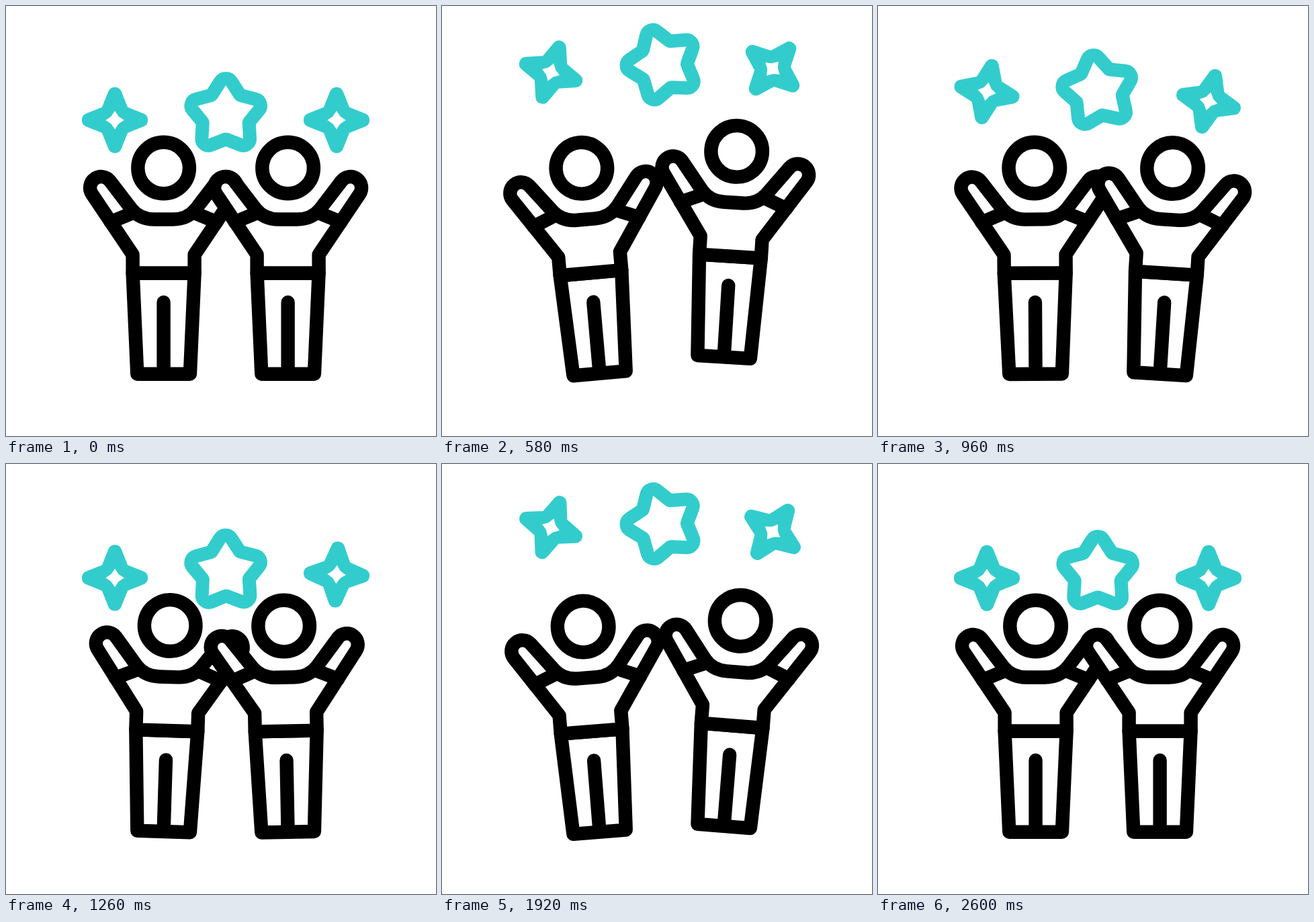
These frames come from a looping animation (640x640 px, 2.62 s). An HTML page with a canvas:

```html
<!DOCTYPE html>
<html lang="en">
<head>
<meta charset="utf-8">
<title>Celebration</title>
<style>
  html, body { margin: 0; width: 100%; height: 100%; overflow: hidden; background: #fff; }
  canvas { display: block; width: 640px; height: 640px; }
</style>
</head>
<body>
<canvas id="stage" width="640" height="640"></canvas>
<script>
const ctx = document.getElementById('stage').getContext('2d');
const LOOP = 2620, STEP = 20;
const INK = '#000', TEAL = '#33cccc', PAPER = '#fff';

const smooth = x => {
  x = Math.min(1, Math.max(0, x));
  return x * x * (3 - 2 * x);
};

// Eased interpolation through [time, value] keys.
function track(t, keys) {
  if (t <= keys[0][0]) return keys[0][1];
  for (let i = 1; i < keys.length; i++) {
    const [t0, v0] = keys[i - 1], [t1, v1] = keys[i];
    if (t < t1) return v0 + (v1 - v0) * smooth((t - t0) / (t1 - t0));
  }
  return keys[keys.length - 1][1];
}

// Rises to 1 at the peak and falls back to 0.
const pulse = (t, peak, rise, fall) =>
  smooth(1 - Math.abs(t - peak) / (t < peak ? rise : fall));

const floatUp = (t, first, second) =>
  Math.max(pulse(t, first, 600, 600), pulse(t, second, 628, 656));

// Closed star with rounded corners, centred at (0, cy).
function roundedStar(points, tip, notch, tipRadius, notchRadius, cy = 0) {
  const n = points * 2;
  const vertex = i => {
    const a = i * Math.PI / points, r = i % 2 ? notch : tip;
    return [r * Math.sin(a), cy - r * Math.cos(a)];
  };
  const [x0, y0] = vertex(0), [x1, y1] = vertex(1);
  const path = new Path2D();
  path.moveTo((x0 + x1) / 2, (y0 + y1) / 2);
  for (let i = 1; i <= n; i++) {
    path.arcTo(...vertex(i), ...vertex(i + 1), i % 2 ? notchRadius : tipRadius);
  }
  path.closePath();
  return path;
}

const bigStar = roundedStar(5, 62.5, 36.2, 10, 3, 4);
const sparkle = roundedStar(4, 40, 16.1, 0.5, 9);
const sparkleHole = roundedStar(4, 13.8, 7.8, 0.2, 6);

function torsoPath() {
  const p = new Path2D();
  const outer = Math.atan2(0.558, 0.83), inner = Math.atan2(0.616, 0.788);
  p.moveTo(-46, 397.5);
  p.lineTo(-46, 370);
  p.arc(-93, 270.5, 16.5, Math.PI - outer, 2 * Math.PI - inner);
  p.lineTo(-48, 302);
  p.bezierCurveTo(-40, 312, -28, 317.5, -14, 317.5);
  p.lineTo(14, 317.5);
  p.bezierCurveTo(28, 317.5, 40, 312, 48, 302);
  p.arc(93, 270.5, 16.5, Math.PI + inner, outer);
  p.lineTo(46, 370);
  p.lineTo(46, 397.5);
  p.closePath();
  return p;
}

const torso = torsoPath();
const legs = new Path2D('M-46 397.5L46 397.5L39.3 547.7L-39.3 547.7Z');
const details = new Path2D('M0 441V547M-79 321.5L-46 308M79 321.5L46 308');
const head = new Path2D();
head.arc(0, 241, 38.3, 0, 2 * Math.PI);

function drawPerson(x, lift, degrees) {
  ctx.save();
  ctx.translate(x, 548 - lift);
  ctx.rotate(degrees * Math.PI / 180);
  ctx.translate(0, -548);
  ctx.strokeStyle = INK;
  ctx.fillStyle = PAPER;
  ctx.lineWidth = 20.4;
  for (const part of [legs, torso, head]) {
    ctx.fill(part);
    ctx.stroke(part);
  }
  ctx.stroke(details);
  ctx.restore();
}

function drawStar(path, hole, x, y, amount, turn) {
  ctx.save();
  ctx.translate(x, y - 77 * amount);
  ctx.rotate(turn * amount * Math.PI / 180);
  ctx.strokeStyle = TEAL;
  ctx.fillStyle = PAPER;
  ctx.lineWidth = 20;
  ctx.stroke(path);
  if (hole) ctx.fill(hole);
  ctx.restore();
}

function draw(t) {
  ctx.fillStyle = PAPER;
  ctx.fillRect(0, 0, 640, 640);
  ctx.lineJoin = ctx.lineCap = 'round';

  drawStar(sparkle, sparkleHole, 162, 169.8, floatUp(t, 680, 1864), 20);
  drawStar(bigStar, null, 327.2, 158, floatUp(t, 643, 1828), -20);
  drawStar(sparkle, sparkleHole, 492, 169.8, floatUp(t, 604, 1787), 40);

  const leftLift = 28 * (pulse(t, 325, 310, 285) + pulse(t, 1545, 315, 300));
  const rightLift = 28 * (pulse(t, 527, 285, 275) + pulse(t, 1747, 280, 275));
  const leftTilt = track(t, [[0, 0], [585, -5], [1197, 2], [1805, -5], [2440, 0]]);
  const rightTilt = track(t, [[220, 0], [778, 5], [1398, -2], [2010, 5], [2600, 0]]);
  drawPerson(234.6, leftLift, leftTilt);
  drawPerson(419.6, rightLift, rightTilt);
}

const start = performance.now();
function tick() {
  const t = (performance.now() - start) % LOOP;
  draw(Math.floor(t / STEP) * STEP);
  requestAnimationFrame(tick);
}
tick();
</script>
</body>
</html>
```
